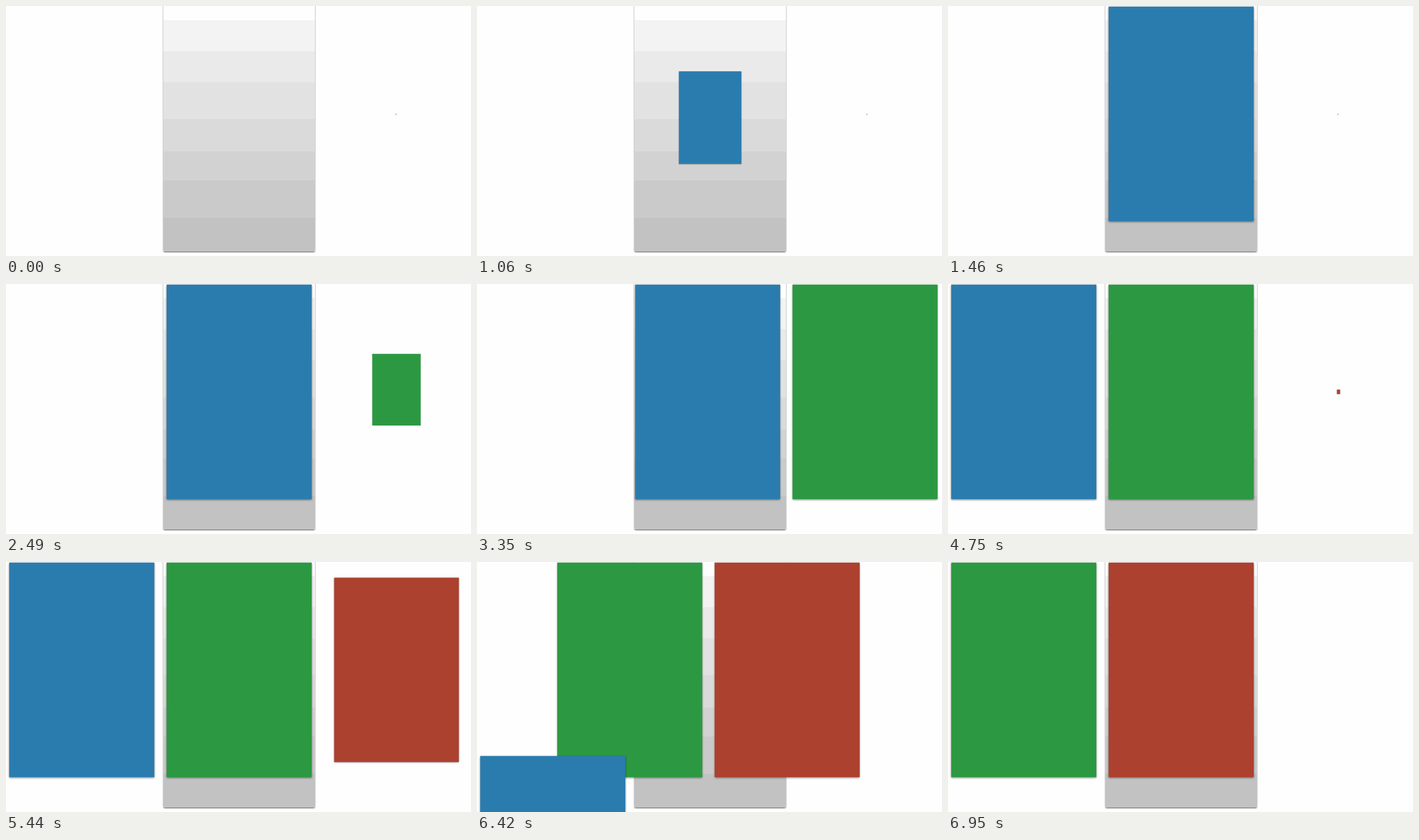
These frames come from a looping animation (718 by 387 pixels, 8120 ms). An HTML page:

```html
<!DOCTYPE html>
<html lang="en">
<head>
<meta charset="utf-8">
<title>Sliding cards</title>
<style>
  html, body { margin: 0; width: 100%; height: 100%; overflow: hidden; background: #fefefe; }
  #stage { position: relative; width: 718px; height: 387px; overflow: hidden; }
  #stage div { position: absolute; }
  #panel {
    left: 243px; top: -10px; width: 234px; height: 390px;
    border-radius: 0 0 2px 2px;
    box-shadow: 0 1px 2px rgba(0, 0, 0, .65);
    background: linear-gradient(#fefefe 32px, #f3f3f3 0 80px, #eaeaea 0 128px, #e2e2e2 0 185px,
      #dadada 0 235px, #d2d2d2 0 280px, #cacaca 0 338px, #c2c2c2 0);
  }
  #dot { left: 601px; top: 167px; width: 2px; height: 1px; }
  .card {
    left: 0; top: 1px; width: 224px; height: 332px;
    box-shadow: 0 1px 3px rgba(0, 0, 0, .55);
    visibility: hidden;
  }
  #blue { background: #2b7cae; z-index: 3; }
  #green { background: #2c9942; z-index: 2; }
  #red { background: #ac412f; z-index: 1; }
</style>
</head>
<body>
<div id="stage">
  <div id="panel"></div>
  <div id="dot"></div>
  <div id="red" class="card"></div>
  <div id="green" class="card"></div>
  <div id="blue" class="card"></div>
</div>
<script>
const LOOP = 8120, STEP = 243, LEFT = 5, MIDDLE = LEFT + STEP, RIGHT = MIDDLE + STEP;
const el = id => document.getElementById(id);

// Smooth curve through [time, value] points, at rest at both ends.
function track(points) {
  const last = points.length - 1;
  const slope = i => i === 0 || i === last ? 0 :
    (points[i + 1][1] - points[i - 1][1]) / (points[i + 1][0] - points[i - 1][0]);
  return t => {
    if (t <= points[0][0]) return points[0][1];
    if (t >= points[last][0]) return points[last][1];
    const i = points.findIndex(p => p[0] > t) - 1;
    const [t0, a] = points[i], [t1, b] = points[i + 1];
    const d = t1 - t0, u = (t - t0) / d, v = 1 - u;
    return a * v * v * (1 + 2 * u) + b * u * u * (1 + 2 * v)
      + d * u * v * (slope(i) * v - slope(i + 1) * u);
  };
}

const grow = {
  blue: track([[590, 0], [1060, .43], [1410, .97], [1460, 1]]),
  green: track([[2020, 0], [2490, .333], [2770, .81], [2950, 1]]),
  red: track([[4650, 0], [5120, .335], [5440, .858], [5640, 1]])
};
const slide1 = track([[3270, 0], [3720, .335], [3960, .757], [4050, .86], [4220, 1]]);
const slide2 = track([[5800, 0], [6420, .51], [6600, .68], [6950, 1]]);

// A small card starts a little above or below its final centre.
function place(id, t, x, y, lift) {
  const s = grow[id](t), style = el(id).style;
  style.visibility = s > .004 ? "visible" : "hidden";
  style.transform = `translate(${x}px, ${y + lift * (1 - s)}px) scale(${s})`;
}

function draw(t) {
  const a = slide1(t) * STEP, b = slide2(t);
  place("blue", t, MIDDLE - a, b * 586, 10);
  place("green", t, RIGHT - a - b * STEP, 0, -5);
  place("red", t, RIGHT - b * STEP, 0, 0);
  el("dot").style.background = t < 2030 ? "#888" : t < 4660 ? "#ccc" : "none";
}

const start = performance.now();
function tick() {
  draw((performance.now() - start) % LOOP);
  requestAnimationFrame(tick);
}
tick();
</script>
</body>
</html>
```
